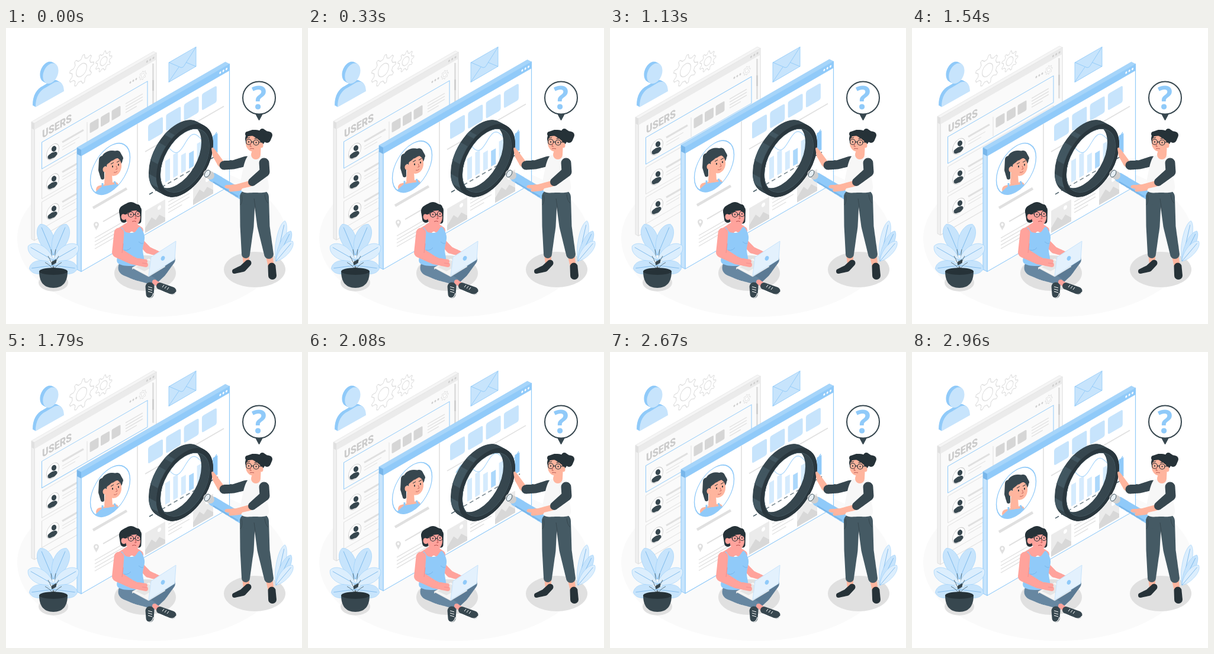
Write an HTML page with a canvas that moves like this. It is 500 by 500 pixels and loops after 3 s.

```html
<!DOCTYPE html>
<html lang="en">
<head>
<meta charset="utf-8">
<title>User research</title>
<style>
html, body { margin: 0; width: 100%; height: 100%; overflow: hidden; background: #fff; }
canvas { display: block; width: 500px; height: 500px; }
</style>
</head>
<body>
<canvas id="c"></canvas>
<script>
const canvas = document.getElementById('c');
const ctx = canvas.getContext('2d');
const dpr = window.devicePixelRatio || 1;
canvas.width = canvas.height = 500 * dpr;

const SLOPE = 0.577, ISO = 0.866, LOOP = 3000, TAU = Math.PI * 2;
const BLUE = '#90caf9', PALE = '#c7e4fc', MIST = '#dceefd', DEEP = '#78b6ea';
const INK = '#263238', SLATE = '#37474f', STEEL = '#455a64';
const SKIN = '#ffa39c', BLUSH = '#f28f8f', PEACH = '#ffb59e', DENIM = '#6787a1', NAVY = '#5b7a94';
const G1 = '#fafafa', G2 = '#f0f0f0', G3 = '#e0e0e0', G4 = '#cfcfcf';

const times = (n, fn) => { for (let i = 0; i < n; i++) fn(i); };

function paint(path, fill, stroke, width = 1) {
  if (fill) { ctx.fillStyle = fill; ctx.fill(path); }
  if (stroke) { ctx.strokeStyle = stroke; ctx.lineWidth = width; ctx.stroke(path); }
}
const shape = (d, fill, stroke, width) => paint(new Path2D(d), fill, stroke, width);
const line = (d, color, width) => shape(d, null, color, width);

function oval(x, y, rx, ry, fill, stroke, width, turn = 0) {
  const p = new Path2D();
  p.ellipse(x, y, rx, ry, turn, 0, TAU);
  paint(p, fill, stroke, width);
}

// Rounded form along joints [x, y, radius], tapering between them
function limb(fill, ...joints) {
  const p = new Path2D();
  for (let j = 1; j < joints.length; j++) {
    const a = joints[j - 1], b = joints[j];
    const steps = Math.ceil(Math.hypot(b[0] - a[0], b[1] - a[1]) * 2);
    times(steps + 1, i => {
      const [x, y, r] = a.map((v, k) => v + (b[k] - v) * i / steps);
      p.moveTo(x + r, y);
      p.arc(x, y, r, 0, TAU);
    });
  }
  paint(p, fill);
}

// Closed smooth curve through points
function blob(fill, ...pts) {
  const p = new Path2D(), n = pts.length, at = i => pts[(i + n) % n];
  p.moveTo(...pts[0]);
  times(n, i => {
    const [a, b, c, d] = [at(i - 1), at(i), at(i + 1), at(i + 2)];
    p.bezierCurveTo(b[0] + (c[0] - a[0]) / 6, b[1] + (c[1] - a[1]) / 6,
      c[0] - (d[0] - b[0]) / 6, c[1] - (d[1] - b[1]) / 6, ...c);
  });
  paint(p, fill);
}

// Runs fn in the slanted wall plane with its origin at x, y
function onWall(x, y, fn) {
  ctx.save();
  ctx.transform(1, -SLOPE, 0, 1, x, y);
  fn();
  ctx.restore();
}
const bar = (x, y, w, color, width) => line(`M${x} ${y}l${w} ${-w * SLOPE}`, color, width);
const disc = (x, y, r, fill, stroke, width) =>
  onWall(x, y, () => oval(0, 0, r, r / ISO, fill, stroke, width));

function tile(x, y, w, h, r, fill, stroke, width) {
  onWall(x, y, () => {
    const p = new Path2D();
    p.roundRect(0, 0, w, h, r);
    paint(p, fill, stroke, width);
  });
}

// Stack of thin lines of text, the last one shorter
const textLines = (x, y, w, gap, n) =>
  times(n, i => bar(x, y + i * gap, i === n - 1 ? w * .65 : w, G3, 1.3));

function gear(x, y, r, teeth, width) {
  onWall(x, y, () => {
    ctx.scale(ISO, 1);
    const p = new Path2D(), step = TAU / teeth;
    times(teeth * 4, i => {
      const q = i % 4, a = (Math.floor(i / 4) + (q - 1.5) * .2) * step;
      const k = q % 3 ? r : r * .76;
      p.lineTo(Math.cos(a) * k, Math.sin(a) * k);
    });
    p.closePath();
    paint(p, '#fff', G3, width);
    oval(0, 0, r * .43, r * .43, '#fff', G3, width);
  });
}

// Slab standing in the wall plane: body, side, top edge and title strip
function slab(x, y, w, h, depth, head, c) {
  const up = -w * SLOPE, back = `l${-depth} ${-depth / 2}`;
  tile(x, y, w, h, 0, c.body, c.edge, 1.2);
  shape(`M${x} ${y}v${h}${back}v${-h}Z`, c.side, c.edge, 1);
  tile(x, y, w, head, 0, c.head);
  shape(`M${x} ${y}v${head}${back}v${-head}Z`, c.end);
  shape(`M${x} ${y}l${w} ${up}${back}l${-w} ${-up}Z`, c.top, c.edge, .6);
  times(3, i => disc(x + w - 5 - i * head * .48, y + up + head * .5 + (5 + i * head * .48) * SLOPE, head * .14, c.dot));
}

function userRow(y, frame) {
  tile(60.5, y - 16, 178.5, 45, 0, null, frame, 1);
  disc(79, y, 10.5, '#fff', G4, 1);
  oval(81, y - 5, 4, 5, SLATE, null, 0, .4);
  limb(SLATE, [74, y + 9, 3.5], [79, y + 6, 4.5], [83.5, y + 3, 3]);
  bar(95, y - 16, 36, G3, 3);
  bar(95, y - 8, 29, G3, 1);
  bar(95, y - 3, 22, G3, 1);
}

function backWindow() {
  slab(48, 161, 206, 198, 5, 11,
    { body: G1, edge: G3, side: G2, head: '#ebebeb', end: G3, top: '#f5f5f5', dot: G4 });
  line('M248.5 60V128', G3, 3);
  line('M248.5 88V106', G4, 3);
  onWall(61, 186.5, () => {
    ctx.scale(ISO, 1);
    ctx.font = '800 18.5px Roboto, sans-serif';
    ctx.fillStyle = '#cbcbcb';
    ctx.fillText('USERS', 0, 0);
  });
  times(3, i => disc(210 + i * 5, 92 - i * 2.9, 1.5, G4));
  gear(231, 80, 7, 8, 1);
  times(3, i => userRow(209 + i * 50.5, i ? G3 : BLUE));
  line('M137 159V192', G3, 1);
  times(3, i => tile(141.5 + i * 18.5, 161 - i * 10.7, 15, 17, 2, '#d6d6d6'));
  textLines(202, 128, 29, 5, 4);
}

function portrait() {
  disc(176, 238, 33.5, '#fff');
  ctx.save();
  const frame = new Path2D(), ring = new Path2D();
  ring.ellipse(0, 0, 33.5, 33.5 / ISO, 0, 0, TAU);
  frame.addPath(ring, new DOMMatrix([1, -SLOPE, 0, 1, 176, 238]));
  ctx.clip(frame);
  limb(SLATE, [163, 222, 6], [161, 240, 5], [163, 253, 3]);
  oval(179, 222, 18, 15, SLATE);
  limb(PEACH, [173, 246, 6], [173, 262, 7]);
  limb(PEACH, [159, 273, 7], [184, 266, 6]);
  limb(BLUE, [154, 284, 7], [166, 277, 10], [186, 274, 10], [197, 282, 7]);
  line('M163 274V262M188 270L183 259', BLUE, 3);
  oval(182.5, 234, 12.5, 16, PEACH, null, 0, .15);
  oval(167.5, 239, 4, 5, PEACH);
  limb(SLATE, [166, 229, 4], [174, 218, 8], [188, 213, 6], [195, 220, 3]);
  [[180, 234], [190, 231]].forEach(([x, y]) => {
    oval(x, y, 1, 1.7, INK);
    bar(x - 3, y - 4, 5, INK, 1);
  });
  line('M186 233l2 5-3 1M182 244Q186 245 188 242', '#c76860', 1);
  ctx.restore();
  disc(176, 238, 33.5, null, BLUE, 1.4);
}

function thumb(x, y) {
  tile(x, y, 34, 37, 1, '#ebebeb');
  onWall(x, y, () => {
    shape('M0 37V29L11 17 18 26 24 20 34 31V37Z', '#d8d8d8');
    oval(24, 8, 3, 3.5, '#fff');
  });
}

function chart() {
  times(7, i => {
    const h = 33 + 7 * Math.sin(i * 1.5 + .5), drop = i * 13.4 * SLOPE;
    tile(269 + i * 13.4, 261 - drop - h, 8, h, 0, i % 3 || !i ? PALE : BLUE);
  });
  const wave = new Path2D();
  times(54, i => wave.lineTo(250 + i * 2, 212 - i * .65 - 11 * Math.sin(i * .24)));
  paint(wave, null, BLUE, 1.2);
  ctx.setLineDash([7, 5]);
  bar(242, 281, 116, STEEL, 1.5);
  ctx.setLineDash([]);
}

function frontWindow() {
  slab(127, 205.5, 250.5, 206, 7, 11,
    { body: '#fff', edge: BLUE, side: PALE, head: BLUE, end: DEEP, top: '#a6d5fa', dot: '#fff' });
  portrait();
  line('M222 162V351', G3, 1.6);
  bar(147, 304, 57, G3, 4.5);
  limb(G3, [152.5, 332, 4.5], [152.5, 341, .5]);
  oval(152.5, 332, 1.8, 2.2, '#fff');
  bar(164, 327, 36, G3, 2);
  textLines(150, 355, 54, 6, 4);
  times(4, i => tile(240 + i * 30.3, 164 - i * 17.5, 25, 28, 3, PALE));
  bar(235, 209, 133, G3, 1.6);
  chart();
  thumb(235, 309);
  thumb(316, 262);
  textLines(274, 294, 36, 6, 4);
}

function floatingIcons() {
  times(8, i => {
    const fill = i < 7 ? BLUE : PALE, dx = i * .7 - 5, dy = i * .4 - 3;
    oval(75.5 + dx, 77 + dy, 12, 18, fill, null, 0, .4);
    shape(`M${50 + dx} ${134 + dy}c0 -18 7 -28 17 -33l15 -9c10 -4 16 3 16 15Z`, fill);
  });
  gear(127.5, 71, 24, 9, 1.4);
  gear(165, 56, 16, 9, 1.3);
  tile(275, 58.5, 46, 33, 0, PALE, BLUE, .8);
  line('M275 58L296 67Q300 67 302 62L321 32M275 91L292 66M321 65L304 58', BLUE, .9);
}

function leaf(x, y, turn, length, width, fill) {
  ctx.save();
  ctx.translate(x, y);
  ctx.rotate(turn);
  shape(`M0 0C${width} ${-length * .3} ${width} ${-length * .9} 0 ${-length}C${-width} ${-length * .9} ${-width} ${-length * .3} 0 0Z`, fill, BLUE, .5);
  line(`M0 0V${-length * .9}`, DEEP, .8);
  ctx.restore();
}

function plants() {
  oval(80, 430, 25, 15, G3);
  times(3, i => [-1, 1].forEach(side => {
    leaf(80, 384 + i * 8.5, side * (.4 + i * .65), 57 - i * 8, 17 - i, i === 1 ? MIST : PALE);
    line(`M80 411Q${80 + side} ${395 + i * 4} ${80 + side * (4 + i * 5)} ${374 + i * 11}`, STEEL, .8);
  }));
  tile(77, 395, 8, 6, 1, SLATE);
  shape('M56 411C56 428 63 439 80 439S104 428 104 411Z', SLATE);
  oval(80, 411, 24, 6, INK);
  times(3, i => leaf(456, 394, .22 + i * .24, 70 - i * 13, 10, i === 1 ? PALE : MIST));
}

function lens() {
  disc(297, 221, 42, 'rgba(255,255,255,.25)');
  // Swept ring gives the thickness of the rim
  times(27, i => disc(289 + i * .5, 217 + i * .27, 44.5, null, i < 26 ? SLATE : '#2a373e', 7));
  times(24, i => onWall(289 + i * .5, 217 + i * .27, () =>
    [[2.75, .35], [3.5, .5], [4.25, .12]].forEach(([a, span]) => {
      const p = new Path2D();
      p.ellipse(0, 0, 47.5, 47.5 / ISO, 0, a, a + span);
      paint(p, null, STEEL, 1);
    })));
  disc(302, 224, 44.5, null, '#2a373e', 6.5);
  disc(302, 224, 41.5, null, STEEL, .8);

  limb(BLUE, [350, 252.5, 8], [397, 281, 8.5]);
  line('M350 260L392 285', DEEP, 2.5);
  limb(G4, [340, 246, 6.5], [345, 249, 7]);
  oval(340, 246, 4, 6.5, '#e6eef3', STEEL, 1, .55);
}

// Round glasses with an eye behind each
function glasses(x, y, gap, drop, r) {
  times(2, i => {
    const cx = x + i * gap, cy = y + i * drop;
    oval(cx, cy, r, r, null, INK, 1.2);
    oval(cx, cy, .9, 1.4, INK);
    line(`M${cx - 3} ${cy - 6.5}l5 -1`, INK, 1);
  });
  line(`M${x + r} ${y}h${gap - r * 2}`, INK, 1.2);
}

function standingWoman() {
  limb(PEACH, [405, 382, 6], [406, 399, 5]);
  limb(PEACH, [444, 382, 6], [448, 403, 5]);
  limb(INK, [409, 397, 5.5], [400, 406, 6], [386, 411, 4]);
  limb(INK, [449, 403, 6.5], [450, 418, 7]);
  limb(STEEL, [408, 286, 13], [407, 335, 11.5], [405, 382, 7]);
  limb(STEEL, [408, 286, 13], [431, 286, 13], [435, 335, 10.5], [444, 382, 8]);
  line('M422 309L419 288M398 282Q400 294 396 299M437 281Q438 292 443 296', SLATE, 1);

  // Raised arm, torso, neck
  limb(PEACH, [363, 229, 6], [354, 215, 5], [349, 204, 2]);
  limb(SLATE, [406, 225, 8.5], [384, 231, 7.5], [368, 232, 7.5]);
  blob('#f7f7f7', [408, 217], [421, 216], [438, 220], [440, 244], [443, 274], [420, 278], [397, 274], [400, 240]);
  limb(PEACH, [424, 204, 6.5], [422, 214, 8]);

  // Head
  limb(INK, [433, 175, 5], [438, 182, 8], [444, 181, 6], [441, 188, 6]);
  oval(421, 187, 17, 15, INK);
  oval(417.5, 194, 12.5, 15, PEACH);
  oval(431, 198, 3.5, 4.5, PEACH);
  limb(INK, [408, 179, 4], [417, 177, 5], [428, 181, 7], [432, 188, 4]);
  glasses(410, 192.5, 12.5, 1, 4.5);
  line('M427 193l6-1', INK, 1.2);
  line('M414 194l-2 6h3M412 204Q415 203 419 204', '#b95c55', 1);

  // Lower arm with hand on the handle
  limb(PEACH, [412, 263, 5], [388, 269, 4.5], [372, 268, 2.5]);
  limb(PEACH, [394, 270, 5], [379, 274, 2.5]);
  limb(SLATE, [436, 228, 8.5], [437, 243, 8.5], [416, 260, 7]);
}

function bubble() {
  shape('M421 144L427.500 156 434 144Z', SLATE, SLATE, 1);
  oval(427.5, 118, 27.5, 27.5, '#fff', SLATE, 2);
  ctx.font = '700 53px "Open Sans", sans-serif';
  ctx.textAlign = 'center';
  ctx.fillStyle = BLUE;
  ctx.fillText('?', 427.5, 136.5);
  ctx.textAlign = 'start';
}

function seatedWoman() {
  // Crossed legs and shoes
  limb(NAVY, [245, 408, 11], [276, 391, 10], [262, 412, 9], [245, 430, 7.5]);
  limb(DENIM, [203, 405, 13.5], [220, 416, 10], [249, 428, 6]);
  limb(SKIN, [251, 429, 4], [258, 434, 4]);
  limb(SLATE, [243, 437, 7.5], [243, 450, 6.5]);
  limb(SLATE, [260, 436, 6], [281, 444, 6.5]);
  line('M238 455Q246 459 249 448M258 442L276 450Q284 451 287 446', '#fff', 1.1);
  times(3, i => line(`M${264 + i * 4} ${438 + i * 2}l3-4M240 ${437 + i * 4}l7 2`, '#fff', 1));

  // Far arm, neck, top
  limb(SKIN, [228, 362, 5.5], [240, 375, 6], [259, 382, 4]);
  limb(SKIN, [197, 344, 9], [211, 334, 8], [225, 342, 7]);
  blob(BLUE, [195, 337], [203, 345], [217, 345], [226, 336], [234, 352], [231, 374], [232, 396], [210, 402], [188, 396], [192, 372], [191, 352]);
  line('M193 373Q205 379 211 371M224 361Q230 366 232 363', DEEP, 1);

  // Head
  limb(INK, [201, 309, 10], [211, 306, 12], [220, 308, 9], [224, 326, 4.5]);
  limb(INK, [199, 310, 8], [199, 323, 6]);
  oval(214.5, 319, 12.5, 15.5, SKIN);
  oval(199, 319, 4.5, 5.2, SKIN);
  limb(INK, [201, 309, 6], [211, 302, 7], [222, 303, 5], [226, 310, 2]);
  glasses(211, 315, 12, -1, 4.5);
  line('M206 314l-7-1', INK, 1.1);
  line('M218 317l2 5h-3M213 327Q217 325 220 327', '#b9504f', 1);

  // Laptop and near arm
  tile(213, 405, 29, 3, 0, G3);
  shape('M213 405L241 389 269 403 241 420Z', '#f5f5f5', G3, .8);
  shape('M219 404L240 392 255 399 234 411Z', '#e5e5e5');
  limb(SKIN, [191, 346, 8.5], [188, 379, 9], [212, 392, 7], [236, 400, 4]);
  limb(SKIN, [224, 394, 5], [236, 394, 3]);
  line('M196 380L198 364M230 397l8 1', BLUSH, 1);
  shape('M245 387L287 360 285 391 241 419Z', '#e3f1fd', PALE, 1);
  oval(265, 389, 3.2, 4, BLUE, null, 0, .4);
}

// Rises by the same height and sinks back once per period
function floating(t, period, fn) {
  ctx.save();
  ctx.translate(0, -4.6 * (1 - Math.cos(TAU * t / period)));
  fn();
  ctx.restore();
}

function draw(now) {
  const t = now % LOOP;
  ctx.setTransform(dpr, 0, 0, dpr, 0, 0);
  ctx.lineJoin = 'round';
  ctx.fillStyle = '#fff';
  ctx.fillRect(0, 0, 500, 500);

  oval(247, 356, 228, 132, G1);
  floating(t, LOOP, backWindow);
  floatingIcons();
  floating(t, LOOP / 2, frontWindow);
  oval(420, 408, 52, 30, G3);
  oval(235, 414, 52, 30, G3);
  plants();
  bubble();
  lens();
  standingWoman();
  seatedWoman();
  requestAnimationFrame(draw);
}
requestAnimationFrame(draw);
</script>
</body>
</html>
```
